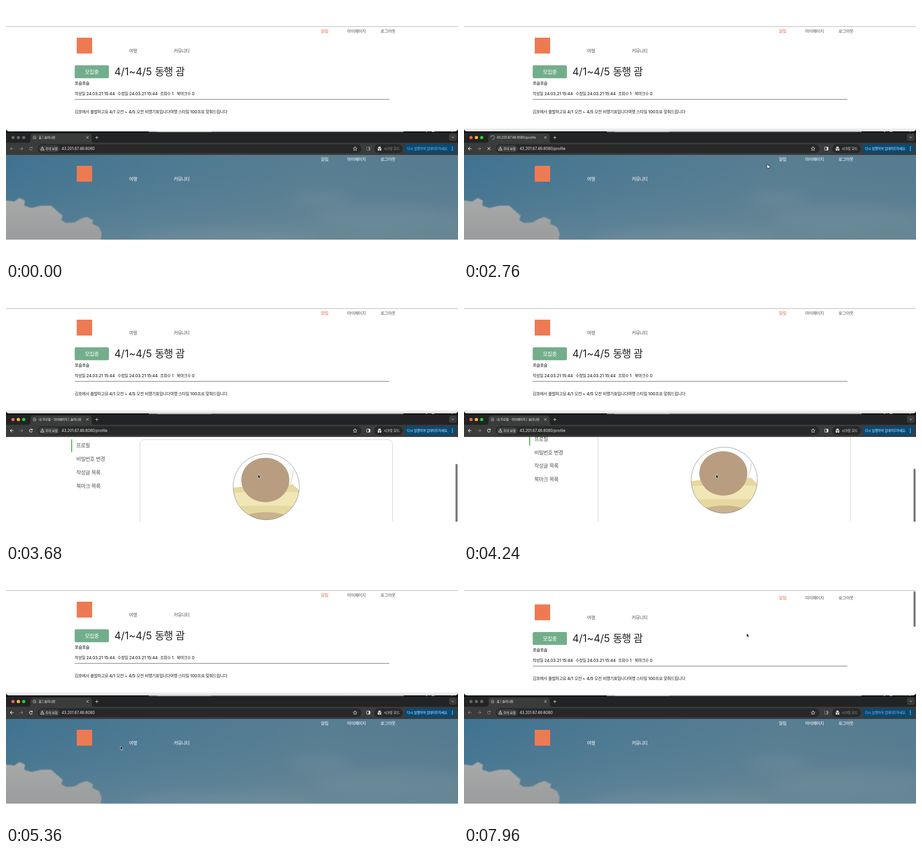
These frames come from a looping animation (997 px wide and 561 px high, 8 s). An HTML page:

```html
<!DOCTYPE html>
<html lang="ko">
<head>
<meta charset="utf-8">
<title>동행 모집</title>
<style>
  html, body { margin: 0; width: 100%; height: 100%; overflow: hidden; background: #fff; }
  svg { display: block; width: 100vw; height: 100vh; }
  text { font-family: Inter, 'Noto Sans CJK KR', 'Noto Sans CJK JP', 'Noto Sans CJK', sans-serif; }
  .ko { letter-spacing: -.056em; }
</style>
</head>
<body>
<svg id="stage" viewBox="0 0 997 561" xmlns="http://www.w3.org/2000/svg"></svg>
<script>
const LOOP = 8000;
const BRAND = '솔미나랑';
const HOST = '43.201.67.46:8080';

// Hangul runs are tracked slightly tighter than Latin ones.
function text(str, x, middle, size, fill, weight = 400) {
  const body = str.replace(/[가-힣]+/g, run => `<tspan class="ko">${run}</tspan>`);
  return `<text x="${x}" y="${middle + size * .36}" font-size="${size}" font-weight="${weight}" fill="${fill}">${body}</text>`;
}
const rect = (x, y, w, h, fill, r = 0) =>
  `<rect x="${x}" y="${y}" width="${w}" height="${h}" rx="${r}" fill="${fill}"/>`;
const line = (d, color, width = 1) =>
  `<path d="${d}" fill="none" stroke="${color}" stroke-width="${width}" stroke-linecap="round" stroke-linejoin="round"/>`;
const group = (id, body, extra = '') => `<g id="${id}" ${extra}>${body}</g>`;

// Site header; y is the middle of the account links.
function header(y, color, alert = color, weight = 400) {
  return text('알림', 694.5, y, 9.5, alert, weight) +
    text('마이페이지', 752.5, y, 9.5, color, weight) +
    text('로그아웃', 826, y, 9.5, color, weight) +
    text('여행', 271.5, y + 43.5, 10, color, weight) +
    text('커뮤니티', 370, y + 43.5, 10, color, weight) +
    rect(156, y + 14, 34, 35, '#ee7a53');
}

function article() {
  const meta = [['작성일 24.03.21 15:44', 151.5], ['수정일 24.03.21 15:44', 246],
    ['조회수 1', 340], ['북마크수 0', 376.5]];
  return header(56, '#555', '#e8694a') +
    rect(151.5, 131, 75.5, 28.5, '#73ae8c', 3) +
    text('모집중', 174, 145.5, 11.7, '#fff', 500) +
    text('4/1~4/5 동행 괌', 239, 145, 22.6, '#222') +
    text('포슬포슬', 151.5, 171, 9.4, '#111', 500) +
    meta.map(([s, x]) => text(s, x, 193.5, 9, '#222', 500)).join('') +
    rect(151.5, 205.7, 694, 1, '#555') +
    text('김포에서 출발하고요 4/1 오전 ~ 4/5 오전 비행기표입니다여행 스타일 100프로 맞춰드립니다',
      151.5, 234, 9.2, '#222', 500);
}

function home() {
  return rect(0, 329, 997, 187, 'url(#sky)') + rect(0, 329, 997, 187, 'url(#haze)') +
    `<g filter="url(#soft)" fill="#8aa0a8" opacity=".2">
      <ellipse cx="850" cy="470" rx="170" ry="26"/><ellipse cx="690" cy="425" rx="70" ry="14"/>
      <ellipse cx="480" cy="515" rx="200" ry="22"/></g>
    <path filter="url(#edge)" fill="url(#cloud)" d="M-9 428L18 432 30 424 42 430 40 441 56 446 78 441 100 441
      112 452 125 463 122 473 132 479 151 478 165 470 178 466 192 473 190 481 205 488 211 502 208 525H-9Z"/>` +
    header(339, '#fff', '#fff', 500);
}

function profile() {
  const items = ['프로필', '비밀번호 변경', '작성글 목록', '북마크 목록'];
  return header(339, '#555') +
    rect(143.7, 414.5, 2.3, 28, '#4db848') +
    items.map((s, i) => text(s, 155, 428.3 + i * 29.7, 11.6, '#555')).join('') +
    `<rect x="295.5" y="415" width="557" height="420" rx="10" fill="#fff" stroke="#ccc"/>
    <g clip-path="url(#avatar)">
      <path d="M500 521L545 516 625 515 632 513 650 530V600H500Z" fill="#e5d8a0"/>
      <path d="M500 533Q570 525 650 532V561H500Z" fill="#f0e6b6"/>
      <ellipse cx="574" cy="591" rx="52" ry="16" fill="#c9b28c"/>
      ${line('M634 482Q632 500 626 514', '#999', .7)}
      <ellipse cx="572" cy="504" rx="53" ry="49" fill="#b99d81"/>
    </g>
    <circle cx="574" cy="519" r="73" fill="none" stroke="#777" stroke-width=".8"/>`;
}

const reload = color => line('M57.6 313A3.3 3.3 0 1 0 58 316.2M58 311.3V313.4H55.8', color, 1.1);
const arrow = (x, dir, color) =>
  line(`M${x - 3.6 * dir} 315H${x + 3.6 * dir}M${x + .4 * dir} 311.8L${x + 3.6 * dir} 315 ${x + .4 * dir} 318.2`, color, 1.1);
const lights = colors => colors.map((c, i) => `<circle cx="${15.5 + i * 11.8}" cy="290.5" r="3.6" fill="${c}"/>`).join('');

// Parts of the browser frame that dim when the window loses focus.
function focusParts(on) {
  const ink = on ? '#eee' : '#858585';
  return lights(on ? ['#fe5f57', '#febc2e', '#28c840'] : ['#646464', '#646464', '#646464']) +
    arrow(13, -1, ink) + arrow(33.5, 1, '#858585') +
    `<rect x="795.5" y="311.5" width="7.5" height="7" rx=".8" fill="none" stroke="${ink}"/>` +
    rect(800, 311.5, 3, 7, ink) +
    text('시크릿 모드', 833, 315, 7.6, on ? '#eee' : '#999') +
    text('다시 실행하여 업데이트하세요.', 884.5, 315, 7.5, on ? '#d5eaff' : '#94b4cc');
}

function browser() {
  return rect(0, 277, 997, 3, '#080808') + rect(315, 277, 562, 1.6, '#8c8c8c') + rect(333, 277, 120, 1.4, '#b5b5b5') +
    rect(926, 277, 3, 1.2, '#999') + rect(939, 277, 6, 1.2, '#aaa') + rect(983, 277, 2, 1.2, '#999') +
    `<path d="M0 303V284Q0 279 6 279H991Q997 279 997 284V303Z" fill="#222324"/>
    <path d="M49 302Q54 302 54 297V288Q54 282 60 282H183Q189 282 189 288V297Q189 302 194 302Z" fill="#3a3b3b"/>` +
    rect(0, 302, 997, 27, '#3a3b3b') + rect(70, 305.5, 714, 19.5, '#282828', 9.7) +
    rect(72.5, 308, 45.5, 14.5, '#3c3d3d', 7.2) +
    rect(812, 305.5, 63, 19.5, '#272828', 9.7) + rect(878.5, 305.5, 115, 19.5, '#064b76', 9.7) +
    rect(977, 282, 17, 16, '#3a3b3b', 5) +
    line('M983.3 289L985.5 291.2 987.7 289', '#ddd') +
    line('M177.4 288.2L181.8 292.6M181.8 288.2L177.4 292.6', '#ddd') +
    line('M197.3 290.5H203.3M200.3 287.5V293.5', '#ddd') +
    line('M80.3 311.3L84 318.3H76.6ZM80.3 313.9V315.5M80.3 317V317.1', '#eee', .9) +
    text('주의 요함', 87, 315, 7.2, '#eee', 500) +
    line('M770 310.8L771.3 313.8 774.4 314 772 316.1 772.8 319.2 770 317.5 767.2 319.2 768 316.1 765.6 314 768.7 313.8Z', '#eee', .9) +
    `<path d="M821.8 310.5H826L826.8 314H821ZM819.4 314.2H828.4V315.3H819.4Z" fill="#eee"/>
    <circle cx="821.7" cy="317.7" r="1.9" fill="#eee"/><circle cx="826.1" cy="317.7" r="1.9" fill="#eee"/>` +
    [311.5, 315, 318.5].map(y => `<circle cx="984.5" cy="${y}" r=".95" fill="#e4f1ff"/>`).join('') +
    group('focused', focusParts(true)) + group('blurred', focusParts(false)) +
    group('reloadOn', reload('#eee')) + group('reloadOff', reload('#858585')) +
    group('stop', line('M52.3 312.3L57.7 317.7M57.7 312.3L52.3 317.7', '#eee', 1.1)) +
    group('globe', `<circle cx="63" cy="290.5" r="4.2" fill="#777"/>` +
      line('M60 288.5L63 290 62 293M64.5 287.5L66 289.5', '#444')) +
    group('spinner', line('M63 286.4A4.1 4.1 0 1 1 58.9 290.5', '#9aa5b0', 1.2)) +
    group('tabHome', text('홈 | ' + BRAND, 72, 290.5, 7, '#eee')) +
    group('tabUrl', text(HOST + '/profile', 72, 290.5, 7.1, '#eee')) +
    group('tabProfile', text('내 프로필 - 마이페이지 | ' + BRAND, 72, 290.5, 7, '#eee')) +
    group('urlHome', text(HOST, 122.5, 315, 8.3, '#eee')) +
    group('urlProfile', text(HOST + '/profile', 122.5, 315, 8.3, '#eee'));
}

const stage = document.getElementById('stage');
stage.innerHTML = `<defs>
  <linearGradient id="sky"><stop stop-color="#437592"/><stop offset=".35" stop-color="#537d95"/>
    <stop offset=".7" stop-color="#5f8294"/><stop offset="1" stop-color="#5c7f92"/></linearGradient>
  <linearGradient id="haze" x2="0" y2="1"><stop stop-color="#2f6585" stop-opacity=".15"/>
    <stop offset="1" stop-color="#7e949b" stop-opacity=".35"/></linearGradient>
  <linearGradient id="cloud" x2="0" y2="1"><stop stop-color="#a8a9a9"/><stop offset="1" stop-color="#999b9c"/></linearGradient>
  <linearGradient id="shade" x2="0" y2="1"><stop stop-color="#ddd" stop-opacity="0"/><stop offset="1" stop-color="#ddd"/></linearGradient>
  <filter id="soft" x="-20%" y="-60%" width="140%" height="220%"><feGaussianBlur stdDeviation="14"/></filter>
  <filter id="edge"><feGaussianBlur stdDeviation="1.3"/></filter>
  <clipPath id="avatar"><circle cx="574" cy="519" r="73"/></clipPath>
  <clipPath id="upper"><path d="M0 46H997V270Q997 277 990 277H7Q0 277 0 270Z"/></clipPath>
  <clipPath id="lower"><rect y="329" width="997" height="187"/></clipPath>
</defs>
${rect(0, 0, 997, 561, '#fff')}${rect(0, 262, 997, 20, '#080808')}
<g clip-path="url(#upper)">${rect(0, 46, 997, 231, '#fff')}${group('article', article())}
  ${group('shadow', rect(0, 268, 997, 9, 'url(#shade)'))}
  ${group('upperBar', rect(991.5, 47, 4.5, 78.5, '#777', 2.2))}</g>
${rect(0, 45, 997, 1, '#aaa')}
${browser()}
<g clip-path="url(#lower)">${rect(0, 329, 997, 187, '#fff')}${group('home', home())}${group('profile', profile())}
  ${group('lowerBar', rect(991.5, 329.7, 4.5, 240, '#777', 2.2))}</g>
${group('pointer', `<path d="M0 0V8.2L1.9 6.5 3.2 9.6 4.6 9 3.3 6H5.8Z" fill="#000" stroke="#fff" stroke-width=".7"/>`)}
${group('hand', `<path d="M-1.2 .2Q0-.6.8.6L1.6 2.8 4.6 3.6Q6.2 4.2 5.9 6L5 9H.8L-2.4 5.6Q-2.2 4.4-.2 5L-1.4 1.4Z" fill="#fff" stroke="#000" stroke-width=".9"/>`)}`;

// [time, x, y]
const cursorPath = [[560, 560, 200], [1280, 700, 450], [1400, 700, 450], [1700, 730, 445], [2140, 768, 340],
  [2320, 768, 340], [2740, 669, 349], [2880, 669, 349], [3360, 556, 412], [4600, 556, 412], [4940, 174, 370],
  [5080, 174, 370], [5340, 252.5, 389], [5840, 252.5, 389], [6280, 562, 435], [6480, 562, 435],
  [6680, 519.5, 136], [7520, 519.5, 136], [7900, 623.5, 140]];
const lowerScroll = [[3260, 0], [3440, 10], [3800, 104], [4160, 104], [4240, 94.5], [4600, 0]];
const upperScroll = [[7640, 0], [7840, 6]];

function sample(steps, t) {
  const next = steps.findIndex(step => step[0] > t);
  if (next === 0) return steps[0].slice(1);
  if (next < 0) return steps[steps.length - 1].slice(1);
  const [a, b] = [steps[next - 1], steps[next]];
  const p = (t - a[0]) / (b[0] - a[0]);
  const eased = p * p * (3 - 2 * p);
  return a.slice(1).map((v, i) => v + (b[i + 1] - v) * eased);
}

const parts = Object.fromEntries([...stage.querySelectorAll('g[id]')].map(g => [g.id, g]));
const show = (id, on) => parts[id].setAttribute('display', on ? 'inline' : 'none');
const move = (id, x, y) => parts[id].setAttribute('transform', `translate(${x} ${y})`);
const within = (t, from, to) => t >= from && t < to;

function render(t) {
  const active = within(t, 1480, 6920);
  const onProfile = within(t, 2920, 5080);
  const atProfile = within(t, 2280, 5040);
  const loading = within(t, 2280, 2920);
  const linked = within(t, 2080, 2920) || within(t, 4900, 5120);
  const [x, y] = sample(cursorPath, t);
  const [scroll] = sample(lowerScroll, t);

  show('focused', active);
  show('blurred', !active);
  show('shadow', active);
  show('reloadOn', active && !loading);
  show('reloadOff', !active);
  show('stop', loading);
  show('globe', !loading);
  show('spinner', loading);
  parts.spinner.setAttribute('transform', `rotate(${t * .36} 63 290.5)`);
  show('tabHome', !loading && !onProfile);
  show('tabUrl', loading);
  show('tabProfile', onProfile);
  show('urlHome', !atProfile);
  show('urlProfile', atProfile);
  show('home', !onProfile);
  show('profile', onProfile);
  show('lowerBar', within(t, 3200, 5000));
  show('upperBar', t >= 7640);
  move('profile', 0, -scroll);
  move('lowerBar', 0, scroll * .734);
  move('article', 0, sample(upperScroll, t)[0]);
  show('pointer', t >= 560 && !linked);
  show('hand', linked);
  move('pointer', x, y);
  move('hand', x, y);
}

const start = performance.now();
function tick() {
  render((performance.now() - start) % LOOP);
  requestAnimationFrame(tick);
}
tick();
</script>
</body>
</html>
```
